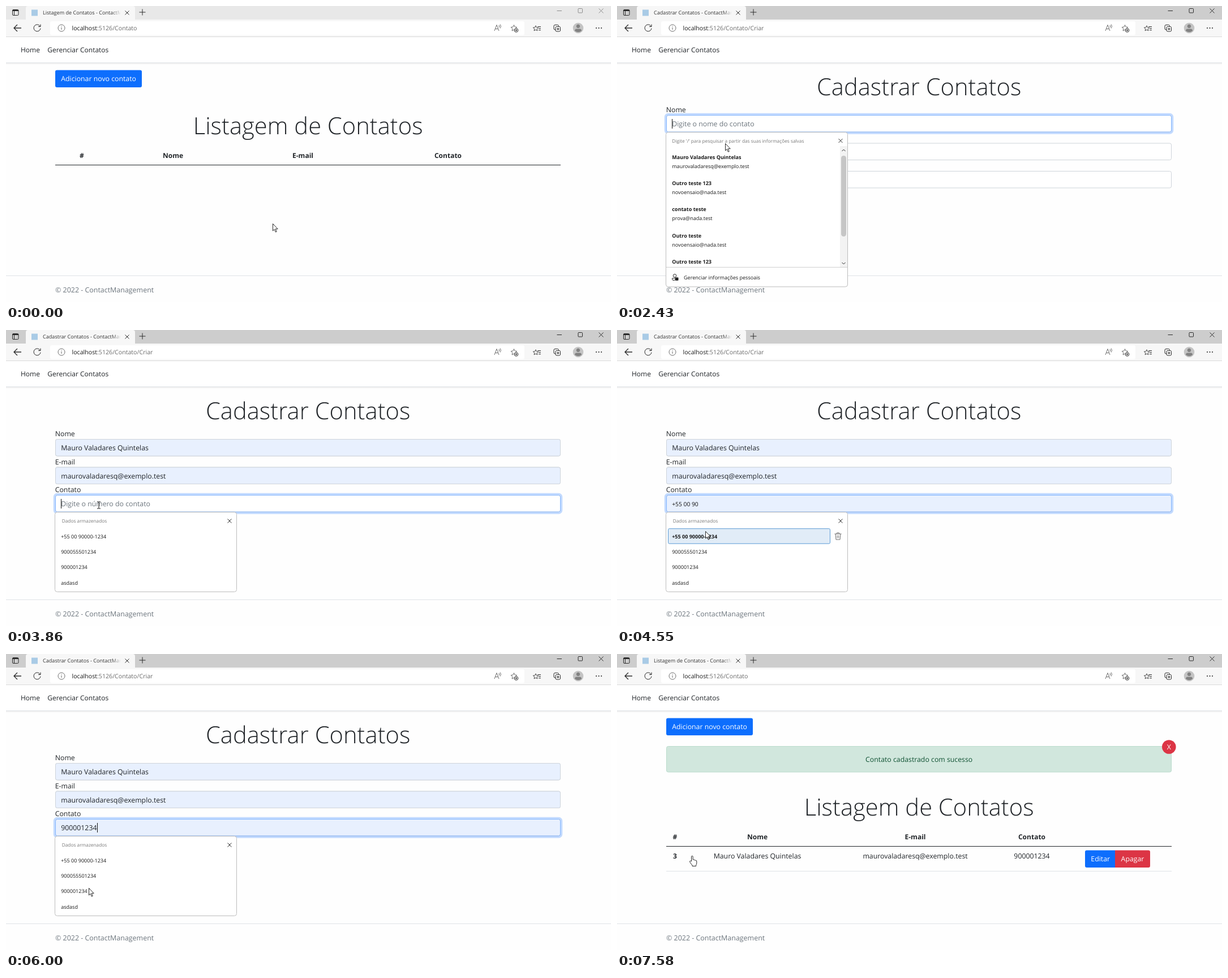
Recreate the animation shown at these times as an HTML page. Size 1069 by 524 pixels, loop 8000 ms.

```html
<!DOCTYPE html>
<html lang="pt-BR">
<head>
<meta charset="utf-8">
<title>Contatos</title>
<style>
  html, body { margin: 0; width: 100%; height: 100%; overflow: hidden; background: #fefefe; }
  svg { display: block; }
  text {
    font-family: "Open Sans", "Noto Sans", sans-serif; font-size: 12.3px;
    fill: #212529; text-rendering: geometricPrecision; white-space: pre;
  }
  .mid { text-anchor: middle; }
  .bold { font-weight: 700; }
  .th { font-size: 12px; font-weight: 700; text-anchor: middle; }
  .title { font-size: 41.7px; font-weight: 300; text-anchor: middle; }
  .nav { font-size: 12px; }
  .footer { font-size: 12.45px; fill: #6c757d; }
  .tab { font-size: 9.08px; fill: #333; }
  .url { font-size: 10.63px; fill: #6b6b6b; }
  .url tspan { fill: #1b1b1b; }
  .small { font-size: 9.05px; fill: #1b1b1b; }
  .hint { font-size: 8.3px; fill: #767676; }
  .preview { font-size: 10.3px; fill: #111; }
  .muted { fill: #6c757d; }
  .white { fill: #fff; }
  .line { fill: none; stroke: #2b2b2b; stroke-width: 1; }
  .dim { stroke: #8c8c8c; }
  .grey { stroke: #6d6d6d; }
  .input { fill: #fff; stroke: #ced4da; }
  .filled { fill: #e8f0fe; }
  .focus { stroke: #86b7fe; }
  .ring { fill: none; stroke: #0d6efd; stroke-opacity: .25; stroke-width: 3.2; }
  .halo { fill: none; stroke: #3184fd; stroke-opacity: .5; stroke-width: 3.2; }
  .popup { fill: #fff; stroke: #bdbdbd; }
  .pick { fill: #e1ecf7; stroke: #5b9bd5; }
</style>
</head>
<body>
<svg id="stage" width="1069" height="524" viewBox="0 0 1069 524">
  <defs>
    <linearGradient id="fade"><stop stop-color="#f7f7f7" stop-opacity="0"/><stop offset="1" stop-color="#f7f7f7"/></linearGradient>
    <linearGradient id="shade" x2="0" y2="1"><stop stop-color="#000" stop-opacity=".07"/><stop offset="1" stop-color="#000" stop-opacity="0"/></linearGradient>
    <clipPath id="tabClip"><path d="M60 0H203V23H60Z"/></clipPath>
    <clipPath id="listClip"><path d="M88 248H407V462H88Z"/></clipPath>
    <path id="cross" d="M-3.5-3.5 3.5 3.5M3.5-3.5-3.5 3.5"/>
    <path id="star" d="M0-5.5 1.6-1.9 5.5-1.5 2.6 1.1 3.4 5 0 3-3.4 5-2.6 1.1-5.5-1.5-1.6-1.9Z"/>
  </defs>

  <!-- browser frame -->
  <path fill="#cdcdcd" d="M0 0H1069V24H0Z"/>
  <path fill="#e8e8e8" d="M0 0H1069V24H0Z" data-on="0-1030"/>
  <path fill="#f7f7f7" d="M0 24H35V4Q35 0 39 0H224Q228 0 228 4V24H1069V54H0Z"/>
  <path fill="#d9d9d9" d="M0 54H1069V55H0Z"/>
  <rect x="78" y="27" width="838" height="24.500" rx="3" fill="#fff"/>
  <g class="line">
    <rect x="11.500" y="6.500" width="10.500" height="10" rx="1.500"/>
    <path stroke-width="2" d="M12 8H22"/><path d="M14.500 8V16"/>
    <use href="#cross" x="214" y="12"/>
    <path d="M235.500 11H246.500M241 5.500V16.500"/>
    <path stroke-width="1.300" d="M27 39H14M20 33 14 39 20 45"/>
    <circle cx="98" cy="39" r="6" class="grey"/><path class="grey" d="M98 38V42M98 35.600V36.800"/>
    <path class="grey" d="M863 44 867 33.500 871 44M864.400 40.500H869.600M871 34Q872.500 36 871 38M873 32.500Q876 36 873 39.500"/>
    <use href="#star" x="897.500" y="39" class="grey"/>
    <circle cx="901.500" cy="43" r="3.300" fill="#fff"/><path d="M899.700 43H903.300M901.500 41.200V44.800"/>
    <use href="#star" transform="translate(936 39.500) scale(.85)"/><path d="M939.500 36.500H945M941 39.500H945M941 42.500H945"/>
    <rect x="968" y="33.500" width="8.500" height="8.500" rx="2"/>
    <rect x="971" y="36.500" width="8.500" height="8.500" rx="2" fill="#f7f7f7"/><path d="M973 40.700H978M975.300 38.500V43"/>
  </g>
  <circle cx="1011" cy="39" r="9.300" fill="#c4c4c4"/>
  <path fill="#828282" d="M1011 32.500A3.300 3.300 0 1 1 1010.900 32.500ZM1005 44Q1005 40.500 1008 40.500H1014Q1017 40.500 1017 44 1011 48.500 1005 44Z"/>
  <path stroke="#222" stroke-width="2" stroke-linecap="round" stroke-dasharray="0 4.500" d="M1043 39H1053"/>
  <g id="windowKeys" class="line"><path d="M973.500 8.500H982"/><rect x="1011" y="4.500" width="7.500" height="7.500" rx="1"/><path d="M1047.500 4.500 1055.500 12.500M1055.500 4.500 1047.500 12.500"/></g>

  <g clip-path="url(#tabClip)">
    <text class="tab" x="65" y="15" data-on="0-1150 7580-8000">Listagem de Contatos - ContactManagement</text>
    <text class="tab" x="65" y="15" data-on="1150-1420">localhost:5126/Contato/Criar</text>
    <text class="tab" x="65" y="15" data-on="1420-7580">Cadastrar Contatos - ContactManagement</text>
    <rect x="187" width="16" y="2" height="20" fill="url(#fade)"/>
  </g>
  <rect x="45" y="6.500" width="11" height="11" fill="#a9cbe6" data-on="0-1150 1420-7320 7580-8000"/>
  <g fill="#1a6fc4" data-on="1150-1270 7320-7440"><circle cx="46" cy="9" r="1.200"/><circle cx="45" cy="14" r="1.200"/></g>
  <g fill="#1a6fc4" data-on="1270-1420 7440-7580"><circle cx="44.800" cy="11.500" r="1.200"/><circle cx="49" cy="15.800" r="1.300"/></g>
  <path class="line" stroke-width="1.400" d="M60.300 36A6 6 0 1 0 61 39.500M61 32.500V36.500H57" data-on="0-1150 1420-7320 7580-8000"/>
  <path class="line" d="M50.500 34.500 59.500 43.500M59.500 34.500 50.500 43.500" data-on="1150-1420 7320-7580"/>
  <text class="url" x="116.500" y="43" data-on="0-1150 7580-8000"><tspan>localhost</tspan>:5126/Contato</text>
  <text class="url" x="116.500" y="43" data-on="1150-7580"><tspan>localhost</tspan>:5126/Contato/Criar</text>

  <!-- page shell -->
  <path fill="#fff" d="M0 55H1069V100H0Z"/>
  <path fill="#dee2e6" d="M0 100H1069V101H0ZM0 477H1069V478H0Z"/>
  <rect y="101" width="1069" height="3" fill="url(#shade)"/>
  <text class="nav" x="26" y="82.300">Home</text>
  <text class="nav" x="73.300" y="82.300">Gerenciar Contatos</text>
  <text class="footer" x="87" y="507.300">© 2022 - ContactManagement</text>

  <!-- list page -->
  <g data-on="0-1420 7580-8000">
    <rect x="85.500" y="111.900" width="156" height="33.700" rx="4.500" class="halo" data-on="1030-1420"/>
    <rect x="87" y="113.500" width="153" height="30.500" rx="3" fill="#0d6efd"/>
    <rect x="87" y="113.500" width="153" height="30.500" rx="3" fill="#0b5ed7" data-on="790-1420"/>
    <text class="mid white" x="163.600" y="133.400">Adicionar novo contato</text>
  </g>
  <g data-on="0-1420">
    <text class="title" x="533.700" y="227.300">Listagem de Contatos</text>
    <text class="th" x="134" y="269.200">#</text><text class="th" x="295" y="269.200">Nome</text>
    <text class="th" x="524.500" y="269.200">E-mail</text><text class="th" x="781" y="269.200">Contato</text>
    <path fill="#212529" d="M87 281H980V282H87Z"/>
  </g>
  <g data-on="7580-8000">
    <rect x="87.500" y="163.500" width="892" height="45.500" rx="3" fill="#d1e7dd" stroke="#badbcc"/>
    <text class="mid" x="533.700" y="191.300" style="fill:#0f5132">Contato cadastrado com sucesso</text>
    <circle cx="975.300" cy="164.500" r="12.300" fill="#dc3545"/>
    <text class="mid white" x="975.300" y="168.800">X</text>
    <text class="title" x="533.700" y="286.300">Listagem de Contatos</text>
    <text class="th" x="102.500" y="328.400">#</text><text class="th" x="248" y="328.400">Nome</text>
    <text class="th" x="527" y="328.400">E-mail</text><text class="th" x="733" y="328.400">Contato</text>
    <path fill="#212529" d="M87 340H980V341H87Z"/>
    <text class="th" x="102.500" y="361.500">3</text>
    <text class="mid" x="248" y="361.500">Mauro Valadares Quintelas</text>
    <text class="mid" x="527" y="361.500">maurovaladaresq@exemplo.test</text>
    <text class="mid" x="733" y="361.500">900001234</text>
    <path fill="#0d6efd" d="M880 347.500V378H830Q827 378 827 375V350.500Q827 347.500 830 347.500Z"/>
    <path fill="#dc3545" d="M880 347.500H939Q942 347.500 942 350.500V375Q942 378 939 378H880Z"/>
    <text class="mid white" x="854.200" y="367.400">Editar</text><text class="mid white" x="911" y="367.400">Apagar</text>
    <path fill="#dee2e6" d="M87 384H980V385H87Z"/>
  </g>

  <!-- form page -->
  <g data-on="1420-7580">
    <text class="title" x="533.700" y="158">Cadastrar Contatos</text>
    <g id="fields"></g>
    <rect x="85.500" y="340.400" width="77.500" height="33.500" rx="4.500" class="halo" data-on="7320-7580"/>
    <rect x="87" y="342" width="74.500" height="30.300" rx="3" fill="#0d6efd"/>
    <rect x="87" y="342" width="74.500" height="30.300" rx="3" fill="#0b5ed7" data-on="6790-7580"/>
    <rect x="165" y="342" width="54" height="30.300" rx="3" fill="#6c757d"/>
    <text class="mid white" x="124.300" y="361.700">Adicionar</text><text class="mid white" x="192" y="361.700">Voltar</text>
  </g>

  <!-- saved profiles -->
  <g data-on="2150-3160">
    <rect class="popup" x="86.500" y="223.500" width="321" height="273.500" rx="4"/>
    <text class="hint" x="97.300" y="241.500">Digite '/' para pesquisar a partir das suas informações salvas</text>
    <use href="#cross" x="395" y="238.500" class="line"/>
    <rect class="pick" x="90.500" y="256.500" width="299" height="36" rx="2" data-on="2670-3160"/>
    <g id="profiles" clip-path="url(#listClip)"></g>
    <path fill="#f3f3f3" d="M394 248H407V462H394Z"/>
    <rect x="396" y="265" width="9" height="143" rx="4.500" fill="#c6c6c6"/>
    <path class="line" d="M397.500 257 400.500 254 403.500 257M397.500 454 400.500 457 403.500 454"/>
    <path fill="#cfcfcf" d="M87 462H407V463H87Z"/>
    <circle cx="102" cy="477.500" r="2.800" class="line"/>
    <path class="line" d="M102 485.500H99Q97.500 485.500 97.500 482H102"/>
    <rect x="102.500" y="480.500" width="6" height="5.500" rx="1" fill="#222"/>
    <text class="small" x="118" y="484">Gerenciar informações pessoais</text>
  </g>

  <!-- saved numbers -->
  <g id="numbers" data-on="3860-6270">
    <rect class="popup" x="86.500" y="322.500" width="321" height="141" rx="4"/>
    <text class="hint" x="98.700" y="341">Dados armazenados</text>
    <use href="#cross" x="395" y="338" class="line"/>
    <g id="choices"></g>
  </g>

  <g id="pointer">
    <path data-shape="arrow" fill="#fff" stroke="#111" stroke-width=".9" d="M.5.5V13L3.300 10.400 5.300 15.200 7.200 14.400 5.200 9.700H9.200Z"/>
    <path data-shape="hand" fill="#fff" stroke="#111" stroke-width=".9" d="M3.500 10V1.800A1.300 1.300 0 0 1 6.100 1.800V7Q8.200 6.200 8.500 7.800 10.500 7.100 10.800 8.600 12.800 8.200 12.800 10V13Q12.800 15 11.600 16.600V18.500H5V17Q2.500 14 .8 11.300 0 9.300 1.600 9.300 2.600 9.400 3.500 10Z"/>
    <path data-shape="beam" fill="none" stroke="#111" d="M0 .5H2.200L3 1 3.800.5H6M3 1V12M0 12.500H2.200L3 12 3.800 12.500H6"/>
  </g>
</svg>
<script>
  const LOOP = 8000;
  const $ = id => document.getElementById(id);

  const person = 'Mauro Valadares Quintelas', mail = 'maurovaladaresq@exemplo.test';
  const rows = ['+55 00 90000-1234', '900055501234', '900001234', 'asdasd'];
  // when each saved number is under the pointer
  const hovers = ['4550-4790', '4790-5310', '5310-5460 5730-6000', '5460-5730'];

  const label = (cls, y, str, on) =>
    `<text class="${cls}" x="97.200" y="${y}" ${on ? `data-on="${on}"` : ''}>${str}</text>`;

  function field(i, name, hint, { empty, fill, focus, texts }) {
    const y = 193.500 + i * 49.500, base = y + 19.600;
    const box = (cls, on) =>
      `<rect class="${cls}" x="87.500" y="${y}" width="892" height="29.500" rx="3" ${on ? `data-on="${on}"` : ''}/>`;
    const ring = focus
      ? `<g data-on="${focus}"><rect class="ring" x="85.400" y="${y - 2.100}" width="896.200" height="33.700" rx="5"/>${box('focus" fill="none')}</g>` : '';
    return `<text x="86.700" y="${y - 5.400}">${name}</text>` + box('input') +
      box('input filled', fill) + ring + label('muted', base, hint, empty) +
      texts.map(([cls, str, on]) => label(cls, base, str, on)).join('');
  }

  const caret = (x, y, on) => `<path stroke="#111" d="M${x} ${y}v17" data-on="${on}"/>`;

  $('fields').innerHTML =
    field(0, 'Nome', 'Digite o nome do contato', {
      empty: '1420-2670', fill: '2670-7580', focus: '2150-3860',
      texts: [['preview', person, '2670-3040'], ['', person, '3040-7580']]
    }) +
    field(1, 'E-mail', 'Digite o e-mail do contato', {
      empty: '1420-2670', fill: '2670-7580',
      texts: [['preview', mail, '2670-3040'], ['', mail, '3040-7580']]
    }) +
    field(2, 'Contato', 'Digite o número do contato', {
      empty: '1420-4550', fill: '4550-7580', focus: '3860-7320',
      texts: [...rows.map((r, i) => ['preview', r.slice(0, 9), hovers[i].replace('6000', '5880')]),
              ['', rows[2], '5880-7580']]
    }) +
    caret(97.500, 200, '2150-2550') +
    caret(97.500, 299, '3860-4260 4670-4910 5190-5880') +
    caret(161.500, 299, '5880-6670');

  $('profiles').innerHTML = [
    [person, mail],
    ['Outro teste 123', 'novoensaio@nada.test'],
    ['contato teste', 'prova@nada.test'],
    ['Outro teste', 'novoensaio@nada.test'],
    ['Outro teste 123', '']
  ].map(([a, b], i) =>
    label('small bold', 270.500 + i * 46.400, a) + label('small', 286.500 + i * 46.400, b)).join('');

  $('choices').innerHTML = rows.map((r, i) => {
    const y = 365 + i * 27.300;
    return label('small', y + 3.600, r) + `<g data-on="${hovers[i]}">
      <rect class="pick" x="90.500" y="${y - 13.300}" width="286" height="26.500" rx="2"/>
      ${label('small bold', y + 3.600, r)}
      <path class="line grey" transform="translate(390.500 ${y})" d="M-6-4H6M-2-4V-6H2V-4M-4.500-4-3.500 6H3.500L4.500-4M-1.300-1.500V3.500M1.300-1.500V3.500"/></g>`;
  }).join('');

  const moves = [
    [0, 'arrow', 471, 385], [250, 'arrow', 372, 290], [370, 'arrow', 291, 215],
    [520, 'arrow', 245, 178], [640, 'arrow', 210, 151],
    [790, 'hand', 186, 128], [910, 'hand', 170, 121],
    [1420, 'arrow', 190, 137], [1560, 'arrow', 207, 178],
    [1680, 'beam', 216, 208], [1830, 'beam', 216, 205], [1980, 'beam', 216, 203],
    [2430, 'arrow', 191, 243], [2550, 'arrow', 197, 254], [2670, 'arrow', 206, 264],
    [2800, 'arrow', 214, 268], [3160, 'beam', 251, 200],
    [3310, 'beam', 226, 244], [3430, 'arrow', 180, 283], [3550, 'beam', 161, 303.500],
    [4260, 'beam', 161, 311], [4400, 'arrow', 161, 341], [4550, 'arrow', 156, 356],
    [4670, 'arrow', 151, 370], [4790, 'arrow', 145, 386], [4910, 'arrow', 140, 403],
    [5310, 'arrow', 143, 420], [5460, 'arrow', 146, 434], [5580, 'arrow', 147, 439],
    [5730, 'arrow', 146, 414], [6410, 'arrow', 166, 402], [6530, 'arrow', 182, 388],
    [6670, 'arrow', 164, 374], [6790, 'hand', 143, 361], [6910, 'hand', 128, 357]
  ];

  const timed = [...document.querySelectorAll('[data-on]')].map(el => ({
    el, spans: el.dataset.on.split(' ').map(s => s.split('-').map(Number))
  }));
  const shapes = [...document.querySelectorAll('[data-shape]')];
  const show = (el, on) => { el.style.display = on ? '' : 'none'; };

  function draw(t) {
    for (const { el, spans } of timed) show(el, spans.some(([a, b]) => t >= a && t < b));
    const [, shape, x, y] = moves.findLast(m => m[0] <= t);
    shapes.forEach(s => show(s, s.dataset.shape === shape));
    $('pointer').setAttribute('transform', `translate(${x} ${y})`);
    $('windowKeys').classList.toggle('dim', t < 1030);
    $('numbers').style.opacity = t < 6120 ? 1 : .4;
  }

  function tick() {
    draw(performance.now() % LOOP);
    requestAnimationFrame(tick);
  }
  tick();
</script>
</body>
</html>
```
